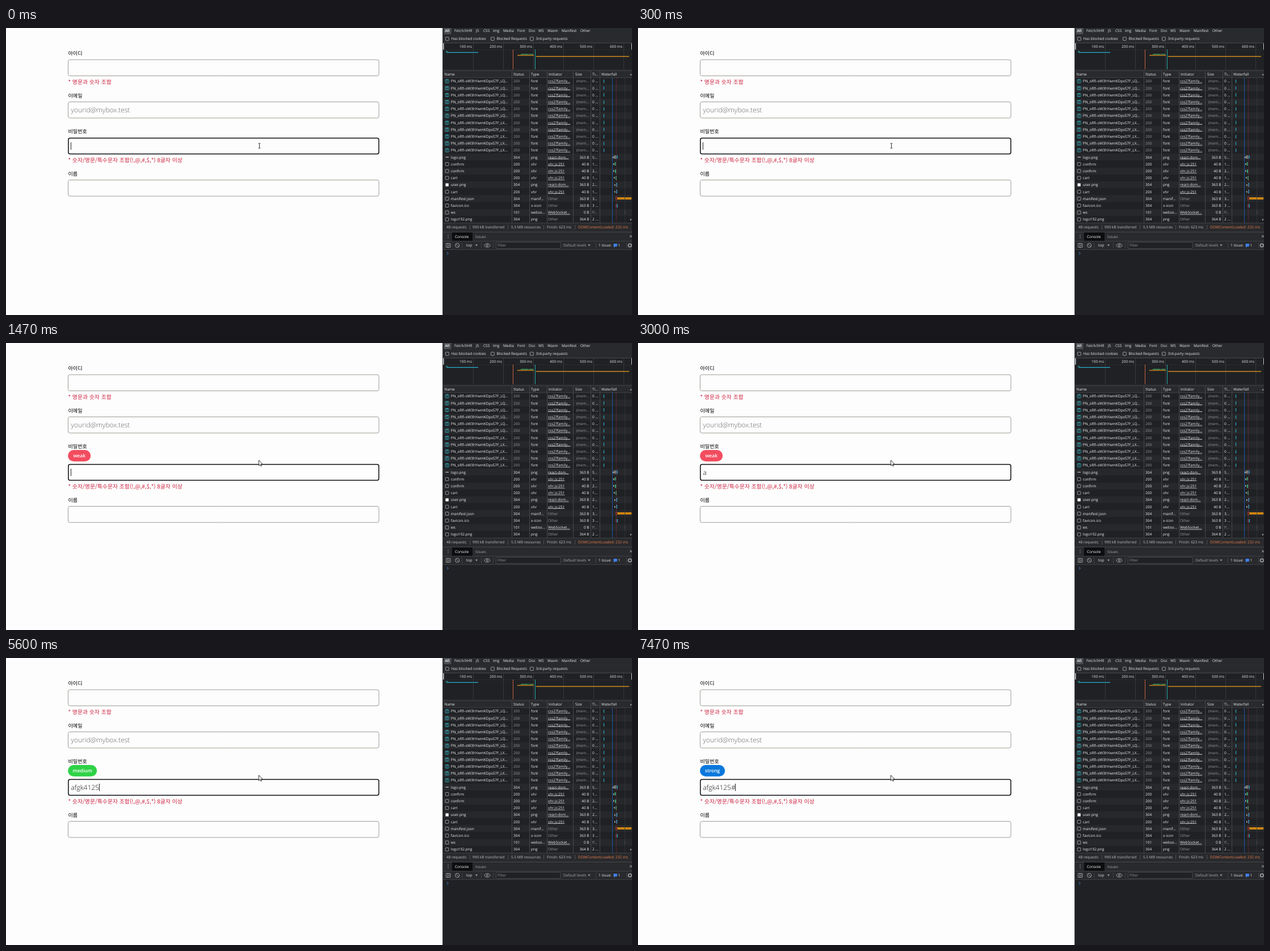
Recreate the animation shown at these times as an HTML page with a canvas. Size 1103 by 507 pixels, loop 8 s.

```html
<!DOCTYPE html>
<html lang="ko">
<head>
<meta charset="utf-8">
<title>Password strength form</title>
<style>
html, body { margin: 0; width: 1103px; height: 507px; overflow: hidden; background: #fdfdfd; }
canvas { display: block; }
</style>
</head>
<body>
<canvas id="stage" width="1103" height="507"></canvas>
<script>
const W = 1103, H = 507, LOOP = 8000;
const UI = '"Open Sans", "Noto Sans", sans-serif';
const KR = '"Noto Sans CJK KR", "Noto Sans CJK", sans-serif';
const ctx = document.getElementById('stage').getContext('2d');
ctx.textRendering = 'geometricPrecision';

// [start ms, typed text, caret shown, strength]
const STEPS = [
  [0, '', true, ''],
  [830, '', false, ''],
  [930, 'a', true, 'weak'],
  [1330, 'af', true, 'weak'],
  [1470, '', true, 'weak'],
  [2000, '', false, 'weak'],
  [2200, 'a', true, 'weak'],
  [3000, 'a', false, 'weak'],
  [3400, 'af', true, 'weak'],
  [3570, 'afg', true, 'weak'],
  [3830, 'afgk', true, 'weak'],
  [4330, 'afgk', false, 'weak'],
  [4470, 'afgk', true, 'weak'],
  [5000, 'afgk', false, 'weak'],
  [5400, 'afgk4', true, 'weak'],
  [5430, 'afgk41', true, 'weak'],
  [5570, 'afgk412', true, 'weak'],
  [5600, 'afgk4125', true, 'medium'],
  [6070, 'afgk4125', false, 'medium'],
  [7430, 'afgk4125#', true, 'strong']
];
const BADGES = { weak: [40, '#f24c5f'], medium: [51, '#2fd247'], strong: [44, '#0a78dc'] };

function rect(x, y, w, h, color) {
  ctx.fillStyle = color;
  ctx.fillRect(x, y, w, h);
}

function box(x, y, w, h, r, stroke, line = 1, fill) {
  ctx.beginPath();
  ctx.roundRect(x, y, w, h, r);
  if (fill) { ctx.fillStyle = fill; ctx.fill(); }
  if (stroke) { ctx.strokeStyle = stroke; ctx.lineWidth = line; ctx.stroke(); }
}

function path(points, color, line = 1, fill) {
  ctx.beginPath();
  points.forEach(([x, y]) => ctx.lineTo(x, y));
  if (fill) { ctx.closePath(); ctx.fillStyle = fill; ctx.fill(); }
  if (color) { ctx.strokeStyle = color; ctx.lineWidth = line; ctx.stroke(); }
}

// y is the vertical middle of the capitals
function text(str, x, y, size, color, { font = UI, weight = 400, align = 'left' } = {}) {
  ctx.font = `${weight} ${size}px ${font}`;
  ctx.textAlign = align;
  ctx.fillStyle = color;
  ctx.fillText(str, x, y + size * 0.36);
  return ctx.measureText(str).width;
}

const small = (str, x, y, color = '#e8eaed', opt) =>
  text(str, x, y, 6.5, color, { weight: 500, ...opt });

function link(str, x, y) {
  const w = small(str, x, y, '#f0f1f3');
  rect(x, Math.round(y + 3), w, 0.8, '#c4c6c9');
}

function checkbox(x, y) {
  box(x + 0.5, y - 2.8, 5.8, 5.8, 0.8, '#a6a9ad', 0.9);
}

function form({ typed, caret, strength }) {
  const shift = strength ? 20 : 0;
  const label = (s, y) => text(s, 109.5, y, 9.1, '#000', { font: KR, weight: 500 });
  const hint = (s, y) => text(s, 109.5, y, 9.85, '#cc1f3c', { font: KR });
  const field = y => box(109.5, y + 0.5, 547.5, 28.5, 3, '#9c9c94', 1, '#fdfdfd');

  rect(0, 0, 769, H, '#fdfdfd');
  label('아이디', 45);
  field(55.5);
  hint('* 영문과 숫자 조합', 95);
  label('이메일', 119.5);
  field(130);
  text('yourid@mybox.test', 114.5, 145, 12, '#666', { weight: 330 });

  label('비밀번호', 183);
  if (strength) {
    const [w, color] = BADGES[strength];
    box(109.2, 189, w, 20.2, 10, null, 0, color);
    text(strength, 109.2 + w / 2, 199, 8.5, '#fff', { weight: 600, align: 'center' });
  }
  const top = 194 + shift;
  box(109.9, top + 0.4, 547, 28, 3, '#080a0e', 1.5, '#fdfdfd');
  const end = text(typed, 114.5, top + 15, 12, '#111', { weight: 340 });
  if (caret) rect(Math.round(114.3 + end), top + 8, 1, 13, '#222');

  hint('* 숫자/영문/특수문자 조합(!,@,#,$,*) 8글자 이상', 233 + shift);
  label('이름', 258 + shift);
  field(268 + shift);
  if (strength) arrow(445.5, 207); else beam(446.5, 208);
}

function arrow(x, y) {
  const shape = [[0, 0], [0, 9.6], [2.2, 7.6], [3.7, 10.8], [5, 10.2], [3.6, 7.1], [6.4, 6.9], [0, 0]];
  path(shape.map(([a, b]) => [x + a, y + b]), '#222', 0.9, '#fff');
}

function beam(x, y) {
  rect(x - 0.5, y - 4, 1, 8, '#333');
  for (const side of [-4.5, 3.7]) rect(x - 2, y + side, 4, 0.9, '#333');
}

function filters() {
  rect(769, 0, 334, 26, '#292a2d');
  box(771.5, -3, 13, 14, 2, null, 0, '#4c4f54');
  small('All', 773.5, 5, '#fff', { weight: 600 });
  const kinds = { 'Fetch/XHR': 790, JS: 828, CSS: 841, Img: 858, Media: 876, Font: 901,
    Doc: 921, WS: 938, Wasm: 954, Manifest: 979, Other: 1012 };
  for (const k in kinds) small(k, kinds[k], 5);
  const checks = { 'Has blocked cookies': 774, 'Blocked Requests': 854, '3rd-party requests': 923 };
  for (const k in checks) {
    checkbox(checks[k], 19);
    small(k, checks[k] + 10.5, 19);
  }
}

function overview() {
  rect(769, 26, 334, 1, '#45474b');
  rect(769, 38, 334, 0.6, '#303235');
  for (let i = 1; i <= 6; i++) {
    const x = 770 + i * 53;
    rect(x, 27, 0.8, 46, '#3d3f43');
    small(`${i}00 ms`, x - 2, 33, '#e8eaed', { align: 'right' });
  }
  rect(770, 27, 1.6, 11, '#c8cacd');
  rect(1102, 27, 1, 11, '#c8cacd');
  rect(774.5, 40.8, 4, 1, '#28a79a');
  rect(776, 42.5, 56, 1.5, '#2799b5');
  rect(901, 47.6, 29, 1.5, '#c68520');
  for (const x of [907, 914, 922]) rect(x, 45.8, 7, 1.2, '#35a66a');
  rect(934, 49.5, 164, 1.6, '#c68520');
  rect(893, 38, 1, 35, '#c8643e');
  rect(932, 38, 1, 35, '#23a9a0');
  rect(769, 73, 334, 3, '#292a2d');
  rect(769, 75, 334, 0.8, '#45474b');
}

const GREY = '#989ba0', PALE = '#b0b2b5', GREEN = '#35a66a', BLUE = '#2c9fc9', RED = '#c63c3c';
const FILES = [
  // name, status, type, initiator, size, time, bars as [x, width, color]
  ['logo.png', 304, 'png', 'react-dom...', '363 B', '5...', [[1069, 1.5, PALE], [1071, 4, '#777'], [1076, 1.5, BLUE]]],
  ['confirm', 200, 'xhr', 'xhr.js:251', '40 B', '1...', [[1070, 1.5, PALE], [1072.5, 2, GREEN]]],
  ['confirm', 200, 'xhr', 'xhr.js:251', '40 B', '2...', [[1070, 1.5, PALE], [1073, 2, GREEN]]],
  ['cart', 200, 'xhr', 'xhr.js:251', '40 B', '1...', [[1071, 1.5, PALE], [1074, 2, GREEN]]],
  ['user.png', 304, 'png', 'react-dom...', '363 B', '2...', [[1072, 1.5, PALE], [1075, 2, BLUE]]],
  ['cart', 200, 'xhr', 'xhr.js:251', '40 B', '1...', [[1072, 1.5, PALE], [1075, 2, BLUE]]],
  ['manifest.json', 304, 'manif...', 'Other', '363 B', '3...', [[1074.5, 1.5, RED], [1077, 25, '#cd8411']]],
  ['favicon.ico', 304, 'x-icon', 'Other', '363 B', '3 ...', [[1074.5, 1.2, RED], [1076.5, 1.4, BLUE]]],
  ['ws', 101, 'webso...', 'WebSocket...', '0 B', 'P...', [[1090, 1, '#777']]],
  ['logo192.png', 304, 'png', 'Other', '364 B', '2 ...', [[1100, 1.5, PALE]]]
];

function fileIcon(i, name, y) {
  if (i < 11) {
    box(774.2, y - 2.9, 6, 6, 0.8, '#2fa5b5', 1);
    small('T', 777.2, y, '#4fc4d3', { align: 'center', weight: 600 });
  } else if (name === 'logo.png') rect(774.5, y - 0.6, 5.5, 1.2, '#c9cbce');
  else if (name === 'user.png') rect(774.5, y - 2.6, 5.3, 5.3, '#fff');
  else checkbox(773.7, y);
}

function table() {
  rect(769, 76, 334, 12, '#292a2d');
  const heads = { Name: 772.5, Status: 894, Type: 925, Initiator: 956, Size: 1003, 'Ti...': 1033, Waterfall: 1049 };
  for (const h in heads) small(h, heads[h], 82, '#f0f1f3');
  path([[1099.5, 83.5], [1102.5, 83.5], [1101, 80.5]], null, 0, '#aaa');
  rect(769, 87.4, 334, 0.8, '#45474b');

  for (let i = 0; i < 21; i++) {
    const y = 94 + i * 12.2, cached = i < 11, white = '#f0f1f3';
    if (i % 2) rect(769, Math.round(y - 6), 334, 12, '#27282b');
    const [name, status, type, from, size, time, bars] = cached
      ? [`PN_oRfi-oW3hYwmKDpxS7F_${i < 6 ? 'LQ' : 'LX'}...`, 200, 'font', 'css2?family...', '(mem...', '0 ...', [[1052.8, 1.3, '#2c9fb5']]]
      : FILES[i - 11];
    fileIcon(i, name, y);
    small(name, 783.8, y, white);
    small(status, 894, y, cached ? GREY : white);
    small(type, 925, y, white);
    if (from === 'Other') small(from, 955, y, GREY); else link(from, 955, y);
    small(size, 1027.5, y, cached ? GREY : white, { align: 'right' });
    small(time, 1033, y, time === 'P...' ? GREY : white);
    for (const [x, w, color] of bars) {
      const tall = w < 2 && color === PALE ? 3 : w > 9 ? 4 : 6;
      rect(x, Math.round(y - tall / 2), w, tall, color);
    }
  }
  for (const x of [891, 922, 953, 999, 1030, 1046]) rect(x, 76, 1, 268, '#45474b');
  rect(1090, 88, 0.7, 256, '#36383b');
  rect(1068, 88, 1, 256, '#1a56a0');
  for (let y = 88; y < 344; y += 4) rect(1075, y, 1, 2.4, '#6e2a32');
}

function statusBar() {
  rect(769, 344, 334, 16, '#292a2d');
  rect(769, 344, 334, 0.8, '#45474b');
  const parts = { '48 requests': 776, '990 kB transferred': 822, '5.5 MB resources': 890, 'Finish: 623 ms': 953 };
  for (const p in parts) small(p, parts[p], 352, '#bcbfc3');
  small('DOMContentLoaded: 232 ms', 1008, 352, '#ea7f4c');
  for (const x of [817, 884, 947, 1002]) rect(x, 348, 0.8, 8, '#55585c');
}

function consolePanel() {
  const y = 384, grey = '#a5a8ac';
  rect(769, 360, 334, 31, '#292a2d');
  rect(769, 360, 334, 0.8, '#505256');
  rect(786, 361, 36, 15, '#0c0d0f');
  for (const d of [-2.6, 0, 2.6]) rect(778.5, 368 + d - 0.5, 1.1, 1.1, grey);
  small('Console', 791, 368.5, '#fff');
  small('Issues', 827, 368.5, grey);
  path([[1099, 366], [1103, 370]], grey, 0.9);
  path([[1103, 366], [1099, 370]], grey, 0.9);
  rect(769, 376, 334, 0.8, '#45474b');

  box(775.5, y - 3.5, 7.5, 7, 0.5, grey, 0.9);
  rect(778, y - 3.5, 0.9, 7, grey);
  path([[782, y - 1.8], [780, y], [782, y + 1.8]], grey, 0.8);
  box(791.5, y - 3.7, 7.4, 7.4, 3.7, grey, 0.9);
  path([[792.7, y - 2.6], [797.8, y + 2.6]], grey, 0.9);
  small('top', 811, y);
  const drop = x => path([[x, y - 1.4], [x + 4, y - 1.4], [x + 2, y + 1.6]], null, 0, grey);
  drop(827);
  ctx.beginPath();
  ctx.ellipse(848, y, 5, 3.2, 0, 0, 7);
  ctx.stroke();
  box(846.4, y - 1.6, 3.2, 3.2, 1.6, grey, 0.9);
  box(863.5, 378.5, 113.5, 11, 1, '#505256', 0.8, '#202124');
  small('Filter', 866, y, '#94979b');
  small('Default levels', 982, y, grey);
  drop(1025.5);
  small('1 Issue:', 1044, y);
  box(1070.5, y - 3, 6.4, 5, 0.8, null, 0, '#3f80e8');
  path([[1071, y + 1], [1073.5, y + 2], [1071, y + 4]], null, 0, '#3f80e8');
  small('1', 1078.5, y);
  for (const x of [803, 837, 858, 1039, 1093]) rect(x, 379, 0.8, 10, '#45474b');
  box(1096.7, y - 2.6, 5.2, 5.2, 2.6, grey, 1.3);
  for (let i = 0; i < 8; i++) {
    const a = i * Math.PI / 4;
    rect(1099.3 + 3.6 * Math.cos(a) - 0.5, y + 3.6 * Math.sin(a) - 0.5, 1, 1, grey);
  }
  rect(769, 391, 334, 0.8, '#45474b');
  path([[777, 395.8], [779.4, 398], [777, 400.2]], '#4088e8', 1);
}

function devtools() {
  rect(769, 0, 334, H, '#202124');
  filters();
  overview();
  table();
  statusBar();
  consolePanel();
  rect(769, 0, 1, H, '#45474b');
}

function draw(ms) {
  const [, typed, caret, strength] = STEPS.filter(s => s[0] <= ms).pop();
  ctx.clearRect(0, 0, W, H);
  form({ typed, caret, strength });
  devtools();
}

const start = performance.now();
function tick() {
  draw((performance.now() - start) % LOOP);
  requestAnimationFrame(tick);
}
tick();
</script>
</body>
</html>
```
